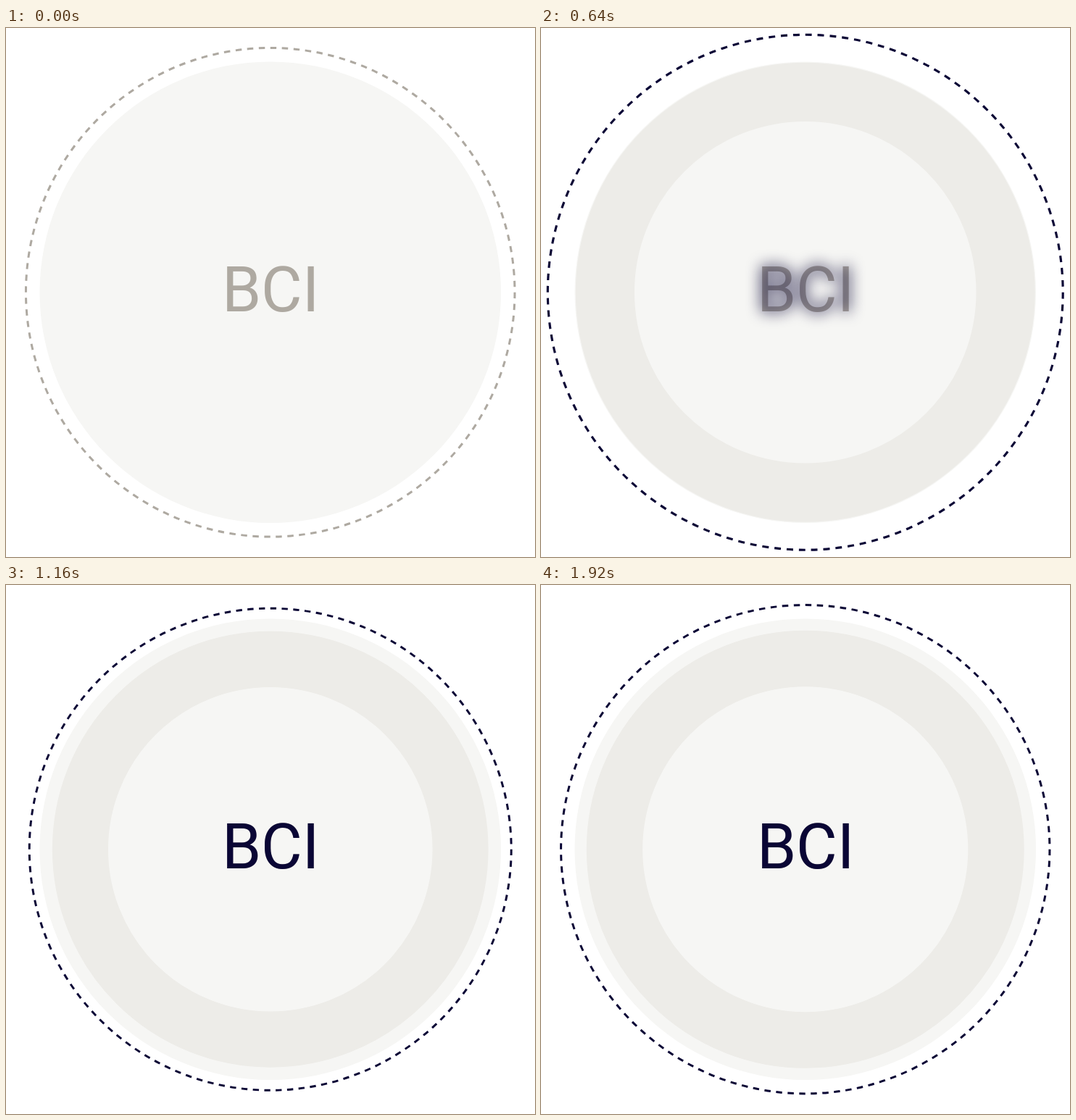
Recreate the animation shown at these times as an HTML page. Size 730 by 730 pixels, loop 1960 ms.

```html
<!DOCTYPE html>
<html lang="en">
<head>
<meta charset="utf-8">
<title>BCI</title>
<style>
  html, body { margin: 0; width: 100%; height: 100%; overflow: hidden; background: #fff; }
  svg { display: block; width: 100vw; height: 100vh; }
  circle { fill: none; }
  .dashes { stroke: currentColor; stroke-width: 3; stroke-dasharray: 1.06 .94; }
  text { font: 87px Roboto, sans-serif; text-anchor: middle; fill: currentColor; }
  .idle { color: #aea9a1; }
  .active { color: #0a0635; }
</style>
</head>
<body>
<svg viewBox="0 0 730 730">
  <g transform="translate(364.75 364.75)">
    <circle r="318.3" style="fill:#f6f6f4"/>
    <g class="idle">
      <circle id="idleRing" class="dashes" r="337.3" pathLength="264"/>
      <text x=".4" y="26.2">BCI</text>
    </g>
    <g class="active">
      <circle id="band" r="263.3" stroke="#edece8" stroke-width="77.4"/>
      <circle id="ring" class="dashes" r="337.3" pathLength="264"/>
      <text id="label" x=".4" y="26.2">BCI</text>
    </g>
  </g>
</svg>
<script>
  const LOOP = 1960, STEP = 40, START = 200;
  const [idleRing, band, ring, label] =
    ['idleRing', 'band', 'ring', 'label'].map(id => document.getElementById(id));

  const clamp = v => Math.min(1, Math.max(0, v));
  const progress = (t, duration) => clamp((t - START) / duration);

  // Damped oscillation around 1; times in ms, crossing is when it first reaches 1.
  const spring = (t, amplitude, decay, frequency, crossing) =>
    1 + amplitude * Math.exp(-decay * (t - crossing)) * Math.sin(frequency * (t - crossing));

  function pose(element, scale, blur, opacity) {
    element.setAttribute('transform', `scale(${scale})`);
    element.style.filter = blur > 0.05 ? `blur(${blur}px)` : 'none';
    element.style.opacity = opacity;
  }

  function draw(t) {
    const fade = progress(t, 160);
    const ringBlur = 7 * (1 - progress(t, 440)) ** 2;
    const bandBlur = 5 * (1 - progress(t, 520)) ** 1.5;
    const labelBlur = 15 * (1 - progress(t, 900) ** 1.6);

    idleRing.style.opacity = 1 - fade;
    pose(ring, spring(t, 0.096, 0.00279, 0.00668, 480), ringBlur, fade);
    pose(band, spring(t, 0.1215, 0.005, 0.00739, 473), bandBlur, fade);
    pose(label, 1, labelBlur, progress(t, 260));
  }

  const origin = performance.now();
  function tick() {
    const t = (performance.now() - origin) % LOOP;
    draw(Math.floor(t / STEP) * STEP);
    requestAnimationFrame(tick);
  }
  tick();
</script>
</body>
</html>
```
